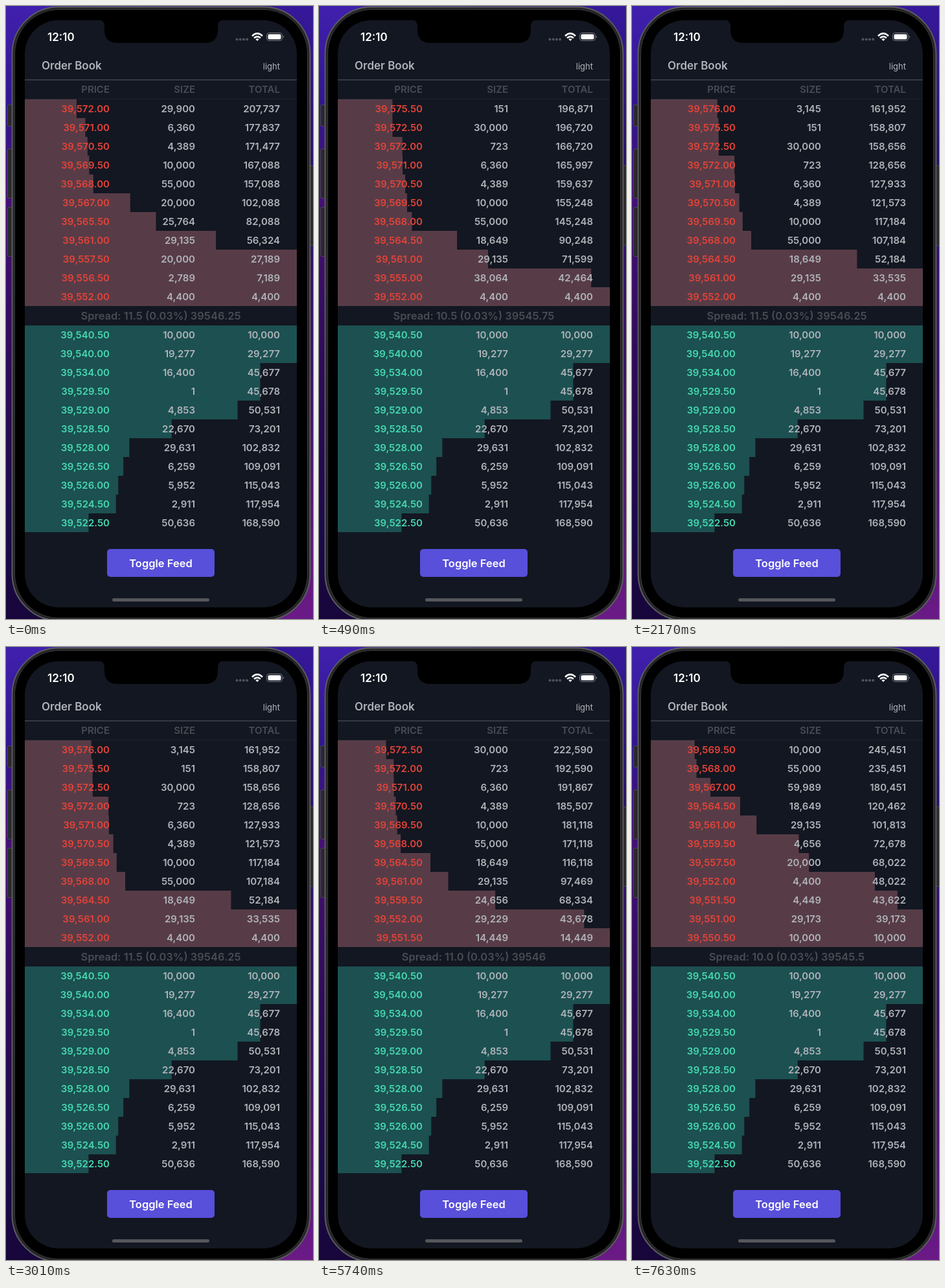
Recreate the animation shown at these times as an HTML page. Size 474 by 946 pixels, loop 8000 ms.

```html
<!DOCTYPE html>
<html lang="en">
<head>
<meta charset="utf-8">
<title>Order Book</title>
<style>
  html, body { margin: 0; width: 100%; height: 100%; overflow: hidden; background: #000; }
  svg { display: block; width: 100%; height: 100%; }
  text { font: 600 15px Inter, Roboto, sans-serif; fill: #b0b3b9; }
  .end text, .end { text-anchor: end; }
  .mid { text-anchor: middle; }
  .dim text, text.dim { fill: #484c54; }
  .ask .price { fill: #e34339; }
  .bid .price { fill: #46d8b0; }
  .ask rect { fill: #573c47; }
  .bid rect { fill: #1c5051; }
</style>
</head>
<body>
<svg viewBox="0 0 474 946" preserveAspectRatio="none">
  <defs>
    <linearGradient id="left" x2="0" y2="1">
      <stop offset="0" stop-color="#4020ae"/>
      <stop offset=".17" stop-color="#30158e"/>
      <stop offset=".3" stop-color="#471078"/>
      <stop offset=".6" stop-color="#2d0a58"/>
      <stop offset=".85" stop-color="#1b0a4a"/>
      <stop offset="1" stop-color="#17063a"/>
    </linearGradient>
    <linearGradient id="right" x2="0" y2="1">
      <stop offset="0" stop-color="#35189a"/>
      <stop offset=".25" stop-color="#27106c"/>
      <stop offset=".6" stop-color="#3b0f66"/>
      <stop offset="1" stop-color="#6b1a86"/>
    </linearGradient>
  </defs>

  <rect width="237" height="946" fill="url(#left)"/>
  <rect x="237" width="237" height="946" fill="url(#right)"/>

  <g fill="#29292c" stroke="#48484b">
    <rect x="2.5" y="152.5" width="9" height="33" rx="1.5"/>
    <rect x="2.5" y="220.5" width="9" height="76" rx="1.5"/>
    <rect x="2.5" y="310.5" width="9" height="76" rx="1.5"/>
    <rect x="467.5" y="246.5" width="9" height="123" rx="1.5"/>
  </g>
  <rect x="9.5" y="1.5" width="460" height="947" rx="72" fill="#242426" stroke="#5c5c5f" stroke-width="2"/>
  <rect x="13.5" y="5.5" width="452" height="939" rx="68" fill="#000" stroke="#3a3a3c"/>
  <rect x="29" y="22" width="420" height="906" rx="52" fill="#131721"/>
  <path d="M143 21.5Q152 22 152 31V37Q152 57 172 57H307Q327 57 327 37V31Q327 22 336 21.5Z"/>

  <text x="64" y="53.5" style="font-size:17px;fill:#fff">12:10</text>
  <path d="M356.500 51.500h16" stroke="#50545d" stroke-width="4" stroke-linecap="round" stroke-dasharray="0 5.200"/>
  <g fill="none" stroke="#fff" stroke-width="2.600">
    <path d="M380 46.200Q388 38.600 396 46.200M383 49.400Q388 44.800 393 49.400"/>
    <path d="M385.300 51.200Q388 49.200 390.700 51.200L388 54Z" fill="#fff" stroke="none"/>
  </g>
  <rect x="402.500" y="41.500" width="24" height="12" rx="3.800" fill="none" stroke="#777a81"/>
  <rect x="404.500" y="43.500" width="20" height="8" rx="2" fill="#fff"/>
  <path d="M428 45.500q2.500 2 0 4Z" fill="#777a81"/>

  <text x="55" y="98" style="font-size:17px">Order Book</text>
  <text class="end" x="423" y="97.500" style="font-size:13px;font-weight:400">light</text>
  <path d="M29 114h420" stroke="#343942" stroke-width="2"/>
  <path d="M29 143.500h420" stroke="#1c212a"/>
  <g class="end dim">
    <text x="160" y="134">PRICE</text>
    <text x="292" y="134">SIZE</text>
    <text x="423" y="134">TOTAL</text>
  </g>

  <g id="asks" class="ask end"></g>
  <text id="spread" class="mid dim" x="239" y="484" style="font-size:16.500px"></text>
  <g id="bids" class="bid end"></g>

  <rect x="156" y="838" width="166" height="43" rx="5" fill="#584fda"/>
  <text class="mid" x="239" y="865.500" style="font-size:16.500px;fill:#fff">Toggle Feed</text>
  <rect x="164" y="914" width="150" height="5" rx="2.500" fill="#55575b"/>
</svg>

<script>
  const LOOP = 8000, ROWS = 11, ROW_HEIGHT = 29, LEFT = 29, WIDTH = 420;

  const baseAsks = {
    39552: 4400, 39561: 29135, 39564.5: 18649, 39568: 55000, 39569.5: 10000, 39570.5: 4389,
    39571: 6360, 39572: 723, 39572.5: 30000, 39575.5: 151, 39576: 3145
  };
  const baseBids = {
    39540.5: 10000, 39540: 19277, 39534: 16400, 39529.5: 1, 39529: 4853, 39528.5: 22670,
    39528: 29631, 39526.5: 6259, 39526: 5952, 39524.5: 2911, 39522.5: 50636
  };

  // Each update holds changes to the base book; size 0 removes a level.
  const updates = [
    { at: 0, asks: { 39556.5: 2789, 39557.5: 20000, 39564.5: 0, 39565.5: 25764, 39567: 20000, 39572: 29900 } },
    { at: 490, asks: { 39555: 38064 }, spread: 10.5 },
    { at: 1330, asks: { 39552: 30340, 39552.5: 10000, 39562: 30000, 39565.5: 25764, 39572: 29900 } },
    { at: 2170 },
    { at: 4900,
      asks: { 39551.5: 14449, 39552: 29229, 39553: 5958, 39559.5: 24656, 39568.5: 20000, 39569: 130676 },
      bids: { 39528: 9200, 39524.5: 0, 39523: 4549 } },
    { at: 5740, asks: { 39551.5: 14449, 39552: 29229, 39559.5: 24656 } },
    { at: 6580, asks: { 39551.5: 14449 } },
    { at: 7630, asks: { 39550.5: 10000, 39551: 29173, 39551.5: 4449, 39557.5: 20000, 39559.5: 4656, 39567: 59989 } }
  ];

  const byId = id => document.getElementById(id);
  const count = n => n.toLocaleString('en-US');
  const money = n => n.toLocaleString('en-US', { minimumFractionDigits: 2 });

  // Levels from the best price outwards, with running totals.
  function levels(book, direction) {
    let total = 0;
    return Object.entries(book)
      .map(([price, size]) => ({ price: +price, size }))
      .filter(level => level.size)
      .sort((a, b) => direction * (a.price - b.price))
      .slice(0, ROWS)
      .map(level => ({ ...level, total: total += level.size }));
  }

  function rows(list, top) {
    const bars = list.map(({ price, total }, i) =>
      `<rect x="${LEFT}" y="${top + i * ROW_HEIGHT}" width="${WIDTH * Math.min(1, price / total)}" height="${ROW_HEIGHT}"/>`);
    const labels = list.map(({ price, size, total }, i) => {
      const y = top + i * ROW_HEIGHT + 20;
      return `<text class="price" x="160" y="${y}">${money(price)}</text>` +
        `<text x="292" y="${y}">${count(size)}</text><text x="423" y="${y}">${count(total)}</text>`;
    });
    return bars.concat(labels).join('');
  }

  function show(update) {
    const asks = levels({ ...baseAsks, ...update.asks }, 1);
    const bids = levels({ ...baseBids, ...update.bids }, -1);
    const bestBid = bids[0].price;
    const spread = update.spread ?? asks[0].price - bestBid;
    const middle = bestBid + spread / 2;
    byId('asks').innerHTML = rows(asks.reverse(), 144);
    byId('bids').innerHTML = rows(bids, 493);
    byId('spread').textContent =
      `Spread: ${spread.toFixed(1)} (${(spread / middle * 100).toFixed(2)}%) ${middle}`;
  }

  const start = performance.now();
  let current;
  function tick() {
    const time = (performance.now() - start) % LOOP;
    const update = updates.findLast(u => u.at <= time);
    if (update !== current) show(current = update);
    requestAnimationFrame(tick);
  }
  tick();
</script>
</body>
</html>
```
